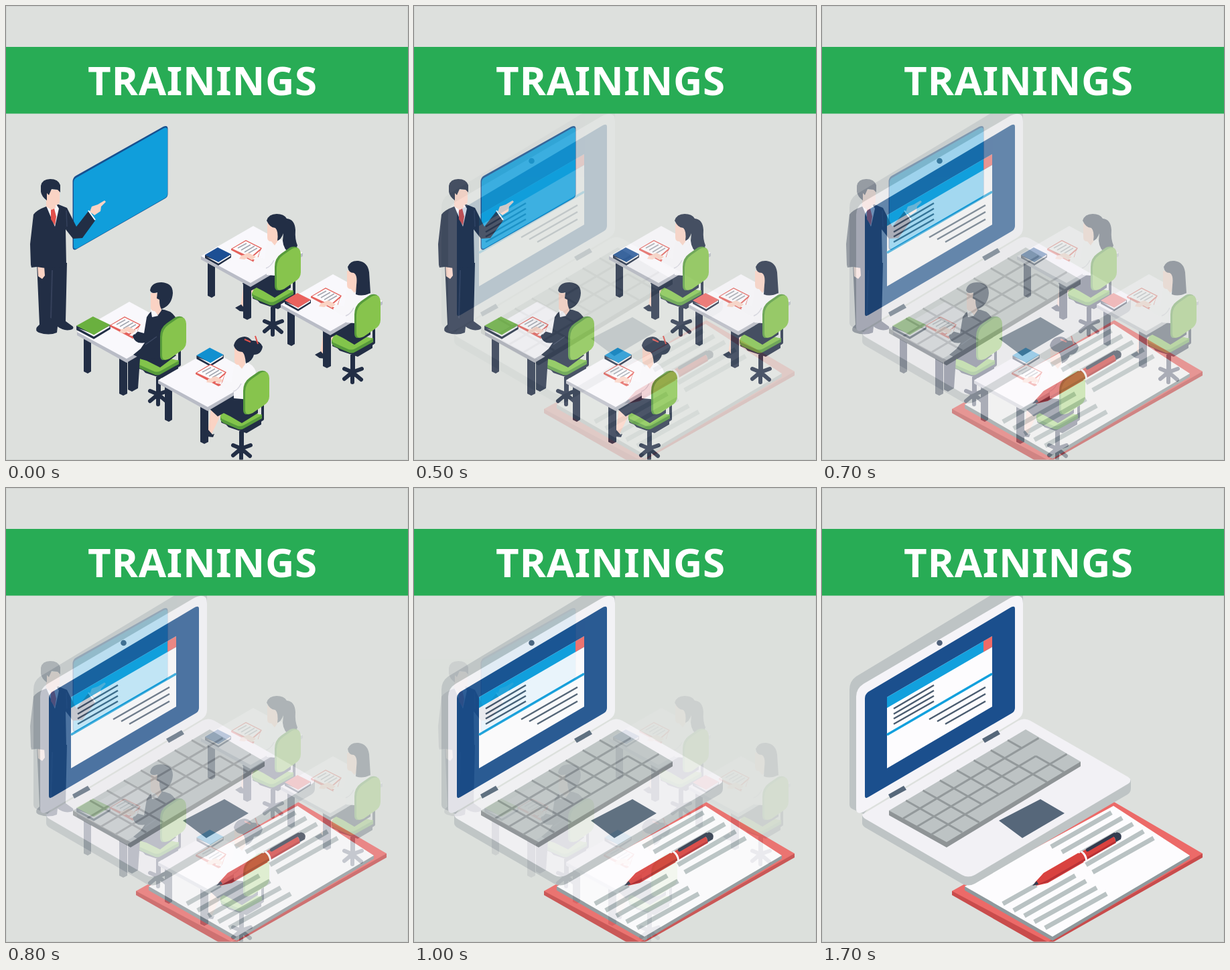
Recreate the animation shown at these times as an HTML page. Size 600 px wide and 677 px high, loop 1.8 s.

```html
<!DOCTYPE html>
<html lang="en">
<head>
<meta charset="utf-8">
<title>Trainings</title>
<style>
html, body { margin: 0; height: 100%; overflow: hidden; background: #dde0dd; }
svg { display: block; width: 100vw; height: 100vh; }
.navy { fill: #222e45; }
.skin { fill: #fad3c4; }
.shirt { fill: #f8f7fa; }
.red { fill: #e2504b; }
.line { fill: none; stroke: #222e45; stroke-linecap: round; stroke-linejoin: round; }
#laptop { animation: fade 1.8s step-end infinite; }
@keyframes fade {
  0% { opacity: 0; }
  5.55% { opacity: .01; }
  11.11% { opacity: .03; }
  16.66% { opacity: .07; }
  22.22% { opacity: .12; }
  27.77% { opacity: .19; }
  33.33% { opacity: .47; }
  38.88% { opacity: .62; }
  44.44% { opacity: .75; }
  50% { opacity: .85; }
  55.55% { opacity: .92; }
  61.11% { opacity: .97; }
  66.66%, 100% { opacity: 1; }
}
</style>
</head>
<body>
<svg viewBox="0 0 600 677" preserveAspectRatio="none">
  <defs>
    <g id="desk">
      <path class="navy" d="M301 378h11v54l-5 3-6-3zM354 410h12v55l-6 3-6-3z"/>
      <path fill="#b9bcc6" d="M291 373v5l74 41 78-46v-5z"/>
      <path fill="#f9f8fc" d="M291 373l78-45 74 40-78 45z"/>
    </g>
    <g id="book">
      <path fill="#222e45" d="M297 371v5l20 11 19-12v-5l-19 10z"/>
      <path fill="#f4f4f6" d="M299 374l18 10 18-11v-2l-18 10z"/>
      <path fill="currentColor" d="M297 371l19-11 20 10-19 12z"/>
    </g>
    <g id="sheet">
      <path fill="#e4625c" d="M336 362l22-13 24 12-3 5-4 14-5 2-34-18z"/>
      <path fill="#fdfcfe" d="M338 362l20-11.500 22 11-15 13zM365 377l14-12-5 14z"/>
      <path d="M346 361l13-7m-8 10l14-8m-9 11l15-9m-10 11l14-8" fill="none" stroke="#a3a7b0" stroke-width="1.500"/>
    </g>
    <g id="seat">
      <path class="line" stroke-width="4" d="M430 410v21l-26 17-34-13"/>
      <path class="navy" d="M369 432l22 9 37-10v8l-22 13-27-9z"/>
      <path fill="#579b3c" d="M367 426v6q1 3 5 5l19 8q6 3 11 0l27-15v-6z"/>
      <path fill="#82c44b" d="M367 425q0-3 4-5l13-7 45 12-27 15q-6 3-12 0l-20-9q-3-2-3-6z"/>
      <path class="navy" d="M395 449h7v26h-7z"/>
      <path class="line" stroke-width="6" d="M398 475l-12-5m12 5l14-5m-14 5l-12 10m12-10l13 11m-13-11v15"/>
    </g>
    <g id="back">
      <path fill="#579b3c" d="M401 389q0-13 10-20l13-9q14-5 15 10v27q0 9-9 14l-17 11q-12 6-12-5z"/>
      <path fill="#87c44d" d="M404 390q0-12 10-19l13-9q12-5 13 8v27q0 9-9 14l-16 11q-11 5-11-5z"/>
    </g>
    <g id="legs">
      <path class="skin" d="M355 414l-5 34 6 3 14-29z"/>
      <path class="navy" d="M342 450l9-5 6 7 3-1-2 5-9-1z"/>
      <path class="navy" d="M353 414q8-16 37-26l35 8v24l-24 15-17-10-10-5-9 5z"/>
    </g>
    <g id="face">
      <path class="skin" d="M390 324h16v26l-5 7-5-6q-6 0-6-6z"/>
    </g>
    <g id="hands" class="skin">
      <path d="M373 374l-11-6-6 2 2 4 9 5zM361 370l-10 2-3 5 8 1 8-5z"/>
    </g>
    <g id="lady">
      <path class="shirt" d="M389 354q6-8 18-7 11 3 15 14l-9 42-24-2v-9q-11-1-20-11l5-7 12 3z"/>
      <path d="M388 391q7-2 12-12" fill="none" stroke="#d6d5df" stroke-width="1.500"/>
      <use href="#face"/><use href="#hands"/>
    </g>
  </defs>

  <path fill="#dde0dd" d="M0 0h600v677H0z"/>

  <g id="class">
    <path fill="#17508f" d="M99.500 262q0-6 5-9l130-73q7-3 7 3v97q0 5-4 7l-133 76q-5 2-5-4z"/>
    <path fill="#109edb" d="M101 263q0-5 4-7l130-73.500q6-3 6 3v94q0 5-4 7l-131 75q-5 2-5-3z"/>

    <g id="teacher">
      <path class="navy" d="M46 383h45l-2 87 11 8q2 4-4 5-10 2-19-5l-1 9q-12 5-27 0-6-3-3-8l4-4z"/>
      <path fill="#35405a" d="M68 394h2l-2 72-2-1z"/>
      <path class="skin" d="M47 386l10 2 1 14-4 5-6-4zM128 299l9-3 10-6 2 2-7 7-1 7-9 6-7-5z"/>
      <path class="navy" d="M41 311q5-7 19-12l16-4 15 6 14 28 18-23 10 14-19 26-14 1-11-14 1 54q-20 7-44 2l-8 1-1-4-1-31z"/>
      <path class="shirt" d="M60 298l14-4 5 8-6 27z"/>
      <path class="red" d="M67 303l5-1 3 12-2 13-6-9z"/>
      <path class="skin" d="M60 274h20v17q-1 6-6 6v4l-6 3-8-5z"/>
      <path class="navy" d="M52 268q2-10 14-10 12 0 15 9v11l-4-4-9-1-4 9-3-3v11q-8-6-9-13z"/>
      <path d="M123 305l10 14" stroke="#fff" stroke-width="2"/>
      <path d="M90 305l1 24" stroke="#34415c" stroke-width="1.500"/>
    </g>

    <use href="#seat"/>
    <use href="#legs"/>
    <use href="#desk"/>
    <use href="#book" color="#1c4f94"/>
    <use href="#sheet"/>
    <use href="#lady"/>
    <path class="navy" d="M389 320q3-10 15-10 11 0 15 7 12 1 13 17-1 14 3 23-3 11-10 12-11-5-12-19l1-11q-4 10-9 11 2-14-3-19-8 0-13-11z"/>
    <use href="#back"/>

    <use href="#seat" x="119" y="71"/>
    <use href="#legs" x="119" y="70"/>
    <use href="#desk" x="119" y="72"/>
    <use href="#book" x="119" y="68" color="#ea625e"/>
    <use href="#sheet" x="119" y="71"/>
    <use href="#lady" x="119" y="71"/>
    <path class="navy" d="M510 389q4-10 16-9 14 2 16 17l2 31q-12 6-22 2l1-14q2-15-4-18-8 0-9-9z"/>
    <use href="#back" x="119" y="71"/>

    <use href="#seat" x="-171" y="104"/>
    <path class="navy" d="M182 518l58-13 14 16-24 18-20-10-10-3-3 44-9 5-6-3z"/>
    <use href="#desk" x="-185" y="113"/>
    <use href="#book" transform="translate(-281 13) scale(1.300 1.250)" color="#6ab03f"/>
    <use href="#sheet" x="-181" y="114"/>
    <path class="navy" d="M210 464q5-11 20-12 16 1 23 12l-10 60-39 3-14-7 11-9 6-9q-14 3-18-10l6-7 11 3z"/>
    <path class="shirt" d="M216 452l8 3 3 7-9 2zM189 486l5-5 3 4-5 5z"/>
    <use href="#hands" x="-179" y="110"/>
    <use href="#face" x="-174" y="104"/>
    <path class="navy" d="M215 424q2-12 17-12 17 1 17 16-1 18-17 24-3-4-3-14l-4-2 1-9q-9 3-11-3z"/>
    <path d="M208 505l17-12" stroke="#3c4862" stroke-width="1.500"/>
    <use href="#back" x="-171" y="104"/>

    <use href="#seat" x="-47" y="185"/>
    <use href="#legs" x="-49" y="187"/>
    <use href="#desk" x="-64" y="185"/>
    <use href="#book" transform="translate(-23 137) scale(1.035)" color="#1190d0"/>
    <use href="#sheet" x="-53" y="185"/>
    <use href="#lady" x="-49" y="184"/>
    <path class="navy" d="M340 506q3-12 16-13 6 0 11 6 12-1 16 9-2 12-13 12-2 9-12 13-1-13-5-17-11-1-13-10z"/>
    <path d="M356 497l9 4m7-9l4 12" stroke="#e2504b" stroke-width="2"/>
    <use href="#back" x="-47" y="185"/>
  </g>

  <g id="laptop">
    <path fill="#dde0dd" d="M0 0h600v677H0z"/>

    <path fill="#c94c4c" d="M194 601v6l137 78 237-134v-6z"/>
    <path fill="#ec6a68" d="M194 601l240-134 134 78-231 132z"/>
    <path fill="#8e999d" d="M213 594v6l131 75 205-122v-5z"/>
    <path fill="#fdfcfe" d="M213 594l222-120 114 74-205 121z"/>
    <path d="M342 535l90-51m-74 59l90-51m-62 53l78-44m-70 61l86-50m-76 61l91-51M270 620l50-28m-34 38l92-52m-76 60l92-52m-77 61l93-51m-77 60l92-51" fill="none" stroke="#b9c2c3" stroke-width="7"/>

    <g transform="translate(314 593) rotate(-30)">
      <path fill="#d9423f" d="M5-2L24-8H84V8H22L5 3zM84-7h56q4 7 0 14H84z"/>
      <path fill="#b83236" d="M5 2l19 2h116v3H22z"/>
      <path fill="#fdfcfe" d="M87-8q4 8 0 16h3q4-8 0-16z"/>
      <path fill="#333c4f" d="M0 0l9-3v6zM140-6h9q7 6 0 12h-9q4-6 0-12z"/>
      <path d="M98-5h46" fill="none" stroke="#333c4f" stroke-width="5" stroke-linecap="round"/>
    </g>

    <path fill="#bec4c5" d="M60 487v13q0 3 4 6l145 84q9 5 19 0l228-133q5-3 5-9v-13z"/>
    <path fill="#f2f1f5" d="M60 487l233-140q9-5 18 0l146 84q7 5 0 10L228 577q-10 5-19 0L64 493q-4-3-4-6z"/>

    <path fill="#bec4c5" d="M41 301q0-13 10-20L265 152h35v50L62 486l-16-7q-5-2-5-7z"/>
    <path fill="#f5f4f8" d="M51 311q0-12 11-19L279 165q21-11 21 7v159q0 9-8 14L62 483q-11 5-11-5z"/>
    <path fill="#1b4f8d" d="M64 314q0-6 5-10l211-125q8-5 8 1v148q0 5-5 8L69 461q-5 3-5-2z"/>
    <circle cx="175.500" cy="231" r="4.300" fill="#50617a"/>
    <path fill="#fdfcfe" d="M97 312l157-91v105L97 418z"/>
    <path fill="#12a0dd" d="M97 312l157-91v16L97 328z"/>
    <path fill="#ef6a67" d="M241 228.500l13-7.500v16l-13 7.500z"/>
    <path d="M97 368l157-91" stroke="#12a0dd" stroke-width="3.500"/>
    <path d="M107 329l60-35m-60 43l60-35m-60 42l60-34m-60 42l60-34m-7 27l84-48m-72 51l72-41m-60 45l60-34" fill="none" stroke="#4b5c70" stroke-width="2.500"/>
    <path fill="#56677a" d="M99 457l23-13 4 6-24 13zM239 374l23-13 4 6-23 13z"/>

    <path fill="#8f9496" d="M100 481v7l86 48 200-121v-7z"/>
    <path fill="#bdc3c4" d="M100 481l204-121 82 48-200 120z"/>
    <g transform="matrix(25.300 -15 21 11.900 100 481)" fill="none" stroke="#93999b" stroke-width="3">
      <path vector-effect="non-scaling-stroke" d="M0 1h8M0 2h7M0 3h8M1 0v4M2 0v4M3 0v3M4 0v3M5 0v3M6 0v4M7 0v1m0 1v2"/>
    </g>
    <path fill="#56677a" d="M264 496l62-32 36 21-63 37z"/>
  </g>

  <path fill="#dde0dd" d="M0 0h600v61H0z"/>
  <path d="M.5.5h599v676H.5z" fill="none" stroke="#c4c8c6" stroke-opacity=".5"/>
  <path fill="#28ac55" d="M0 61h600v99.500H0z"/>
  <text x="122" y="133" fill="#fff" font-family="'Noto Sans', 'Open Sans', sans-serif" font-weight="700" font-size="60" letter-spacing=".700">TRAININGS</text>
</svg>
</body>
</html>
```
